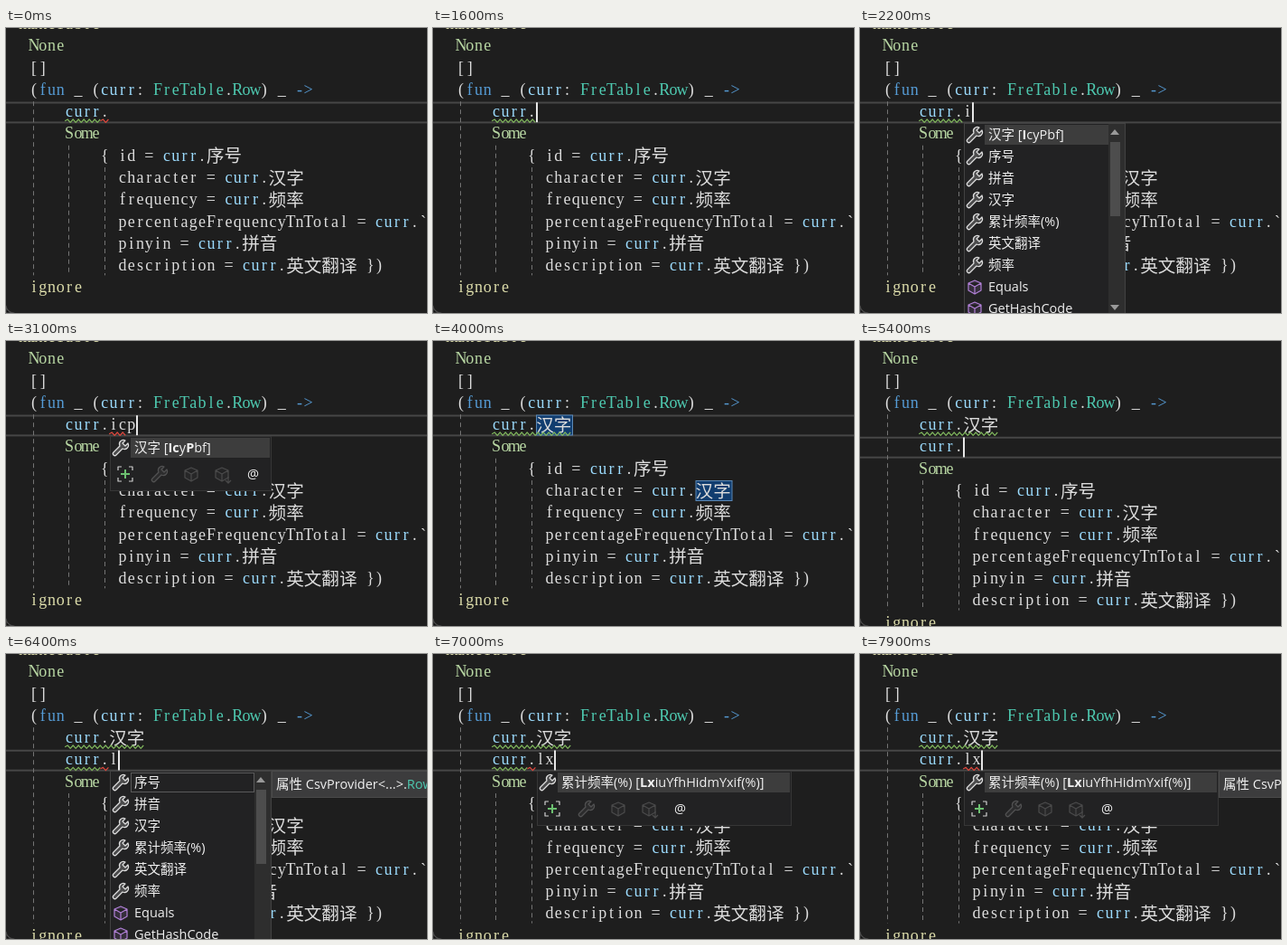
These frames come from a looping animation (466 by 315 pixels, 8 s). An HTML page:

```html
<!DOCTYPE html>
<html lang="zh">
<head>
<meta charset="utf-8">
<title>Pinyin completion</title>
<style>
  html, body { margin: 0; width: 100%; height: 100%; overflow: hidden; background: #1e1e1e; }
  svg { display: block; }
  text { white-space: pre; }
  .code { font: 18px "Liberation Serif", serif; text-anchor: middle; font-variant-ligatures: none; }
  .han { font: 300 19.6px "Noto Sans CJK SC", "Noto Sans CJK", sans-serif; }
  .ui { font: 14.5px "Open Sans", "Noto Sans CJK SC", "Noto Sans CJK", sans-serif; fill: #f0f0f0; }
</style>
</head>
<body>
<svg id="stage" width="466" height="315" viewBox="0 0 466 315"></svg>
<script>
const LOOP = 8000, CELL = 9.8, PITCH = 24.27;
const colX = c => 26 + c * CELL;
const rowY = r => 8.4 + r * PITCH;
const esc = s => s.replace(/&/g, '&amp;').replace(/</g, '&lt;');

const COLORS = { p: '#dcdcdc', f: '#dcdcaa', g: '#b8d7a3', k: '#569cd6', t: '#4ec9b0', v: '#9cdcfe' };

// Each line: column, then tokens "colour:text"
const HEAD = [
  [-1, 'f:makeTable'],
  [0, 'g:None'],
  [0, 'p:[]'],
  [0, 'p:(', 'k:fun', 'p: _ (', 'v:curr', 'p:: ', 't:FreTable', 'p:.', 't:Row', 'p:) _ ', 'k:->'],
];
const field = (name, value) => [10, 'p:' + name + ' = ', 'v:curr', 'p:.' + value];
const TAIL = [
  [4, 'g:Some'],
  [8, 'p:{ id = ', 'v:curr', 'p:.序号'],
  field('character', '汉字'),
  field('frequency', '频率'),
  field('percentageFrequencyTnTotal', '``'),
  field('pinyin', '拼音'),
  [...field('description', '英文翻译'), 'p: })'],
  [0, 'f:ignore'],
];

const MEMBERS = ['序号', '拼音', '汉字', '累计频率(%)', '英文翻译', '频率', 'Equals', 'GetHashCode'];
const bold = s => esc(s).replace(/\*(.+?)\*/g, '<tspan font-weight="700">$1</tspan>');

const rect = (x, y, w, h, fill, stroke = 'none') =>
  `<rect x="${x}" y="${y}" width="${w}" height="${h}" fill="${fill}" stroke="${stroke}"/>`;
const path = (d, stroke, fill = 'none', width = 1.2) =>
  `<path d="${d}" stroke="${stroke}" fill="${fill}" stroke-width="${width}" stroke-linejoin="round"/>`;
const at = (x, y, body, opacity = 1) => `<g transform="translate(${x} ${y})" opacity="${opacity}">${body}</g>`;
const label = (x, y, s) => `<text class="ui" x="${x}" y="${y}">${s}</text>`;

const WRENCH = path('M-8 5L-1 -2C-3 -6 1 -10 5 -8L2 -5L5 -2L8 -5C10 -1 6 3 2 1L-5 8A2 2 0 0 1 -8 5Z', '#dedede', '#ffffff30');
const cube = color => path('M0-7L7-4V4L0 8L-7 4V-4ZM-7-4L0 0L7-4M0 0V8', color, color + '22');

// Latin letters sit centred in their cells, Han characters take two cells
function codeLine(row, [col, ...tokens]) {
  let out = '';
  for (const token of tokens) {
    for (const run of token.slice(2).match(/[\u4e00-\u9fff]+|[^\u4e00-\u9fff]+/g) || []) {
      const han = run > '\u4e00';
      const xs = han ? colX(col) : [...run].map((_, i) => colX(col + i + .5).toFixed(1)).join(' ');
      out += `<text class="${han ? 'han' : 'code'}" x="${xs}" y="${rowY(row) + (han ? 18.6 : 17)}" fill="${COLORS[token[0]]}">${esc(run)}</text>`;
      col += run.length * (han ? 2 : 1);
    }
  }
  return out;
}

function guide(x, from, to) {
  return `<path d="M${x} ${from}V${to}" stroke="#747474" stroke-dasharray="5 4"/>`;
}

function squiggle(row, from, to, color) {
  const y = rowY(row) + 21.5;
  let d = `M${colX(from)} ${y}`;
  for (let x = colX(from) + 3, up = -1; x <= colX(to) + 1; x += 3, up = -up) d += `L${x} ${y + up * 1.7}`;
  return path(d, color);
}

function tooltip(x, y, body) {
  return rect(x + .5, y + .5, 480, 29, '#3c3c3d', '#4a4a4a') + label(x + 5, y + 20, body);
}

function iconBar(x, y) {
  return at(x + 17, y, path('M-4-8H-8V-4M4-8H8V-4M-4 8H-8V4M4 8H8V4', '#d0d0d0') + path('M-5 0H5M0-5V5', '#6cc070', 'none', 2)) +
    at(x + 55, y, WRENCH, .25) +
    at(x + 90, y, cube('#c0c0c0'), .25) +
    at(x + 124, y, cube('#c0c0c0') + path('M7 3V10M4 7L7 10L10 7', '#c0c0c0'), .25) +
    label(x + 152, y + 5, '@');
}

function menuItem(x, y, text) {
  const method = /^(Equals|GetHash|\*curr)/.test(text);
  return at(x + 12, y, method ? cube('#b180d7') : WRENCH) + label(x + 27, y + 5, bold(text));
}

function fullList(x, y, items, soft) {
  let out = rect(x + .5, y + .5, 178, 260, '#222223', '#424242') + rect(x + 160, y + 1, 18, 260, '#2e2e2e');
  out += soft ? rect(x + 23.5, y + 2.5, 136, 21, 'none', '#5a5a5a') : rect(x + 23, y + 2, 137, 22, '#3d3d3d');
  items.forEach((s, i) => out += menuItem(x, y + 13 + i * 24, s));
  return out + rect(x + 162, y + 21, 11, 82, '#4d4d4d') +
    path(`M${x + 162} ${y + 13}l5-6l5 6zM${x + 162} ${y + 201}l5 6l5-6z`, 'none', '#999');
}

function singleItem(x, y, width, text) {
  return rect(x + .5, y + .5, width - 1, 60, '#222223', '#363636') +
    rect(x + 23, y + 2, width - 25, 22, '#3d3d3d') + menuItem(x, y + 13, text) + iconBar(x, y + 42);
}

const typeName = s => `<tspan fill="${COLORS.t}">${s}</tspan>`;
const rowType = 'CsvProvider&lt;...>.' + typeName('Row');

const POPUPS = {
  icyAll: () => fullList(115, 105, ['汉字 [*I*cyPbf]', ...MEMBERS]),
  icy: () => singleItem(115, 105, 179, '汉字 [*Ic*yPbf]'),
  icp: () => singleItem(115, 105, 179, '汉字 [*Ic*y*P*bf]'),
  curr: () => singleItem(66, 129, 179, '*curr*'),
  all: () => fullList(115, 129, MEMBERS, true),
  lx: () => singleItem(115, 129, 282, '累计频率(%) [*Lx*iuYfhHidmYxif(%)]'),
};

// Each step overrides part of the state from its time on
const STEPS = [
  [0, { lines: ['curr.'], caret: 0, popup: '', tip: 0, marks: 0, wavy: [[0, 4, 8, 0], [0, 8, 9, 1]] }],
  [600, { caret: 1 }],
  [700, { wavy: [[0, 4, 9, 0]] }],
  [1100, { caret: 0 }],
  [1600, { caret: 1 }],
  [1800, { lines: ['curr.i'] }],
  [2200, { popup: 'icyAll' }],
  [2300, { lines: ['curr.ic'], popup: 'icy' }],
  [2400, { wavy: [[0, 9, 10, 1]] }],
  [2700, { tip: 294 }],
  [2900, { lines: ['curr.icp'], popup: 'icp' }],
  [3000, { tip: 0 }],
  [3100, { wavy: [[0, 9, 11, 1]] }],
  [3400, { lines: ['curr.汉字'], popup: '', wavy: [] }],
  [3800, { marks: 1 }],
  [3900, { caret: 0 }],
  [4000, { wavy: [[0, 4, 13, 0]] }],
  [4100, { lines: ['curr.汉字', ''], caret: 1, marks: 0 }],
  [4500, { lines: ['curr.汉字', 'c'] }],
  [4700, { lines: ['curr.汉字', 'cu'] }],
  [4800, { lines: ['curr.汉字', 'cur'] }],
  [4900, { lines: ['curr.汉字', 'curr'] }],
  [5200, { popup: 'curr', tip: 245 }],
  [5400, { lines: ['curr.汉字', 'curr.'], popup: '', tip: 0 }],
  [5800, { popup: 'all' }],
  [5900, { caret: 0 }],
  [6100, { tip: 294 }],
  [6300, { lines: ['curr.汉字', 'curr.l'], caret: 1 }],
  [6400, { wavy: [[0, 4, 13, 0], [1, 4, 8, 0], [1, 8, 9, 1]] }],
  [6900, { tip: 0, lines: ['curr.汉字', 'curr.lx'] }],
  [7000, { popup: 'lx' }],
  [7100, { wavy: [[0, 4, 13, 0], [1, 9, 10, 1]] }],
  [7400, { caret: 0, tip: 397 }],
  [7900, { caret: 1, wavy: [[0, 4, 13, 0], [1, 9, 11, 1]] }],
];

function draw(s) {
  const n = s.lines.length, active = 2 + n, y = rowY(active), end = rowY(active + 8) - 2;
  let out = rect(0, 0, 466, 315, '#1e1e1e');
  out += rect(0, y + .3, 466, 2, '#464646') + rect(0, y + 22.2, 466, 2, '#464646');
  out += guide(30.5, rowY(3), end) + guide(69.5, rowY(active + 2), end) + guide(109.5, rowY(active + 3), end);
  if (s.marks) {
    out += rect(114.5, 82, 40, 22, '#113d6f', '#5b88b5') + rect(291, 154.5, 40, 22, '#113d6f', '#5b88b5');
  }
  const typed = s.lines.map(line => [4, 'v:' + line.slice(0, 4), 'p:' + line.slice(4)]);
  [...HEAD, ...typed, ...TAIL].forEach((line, i) => out += codeLine(i - 1, line));
  for (const [i, from, to, bad] of s.wavy) out += squiggle(3 + i, from, to, bad ? '#e0483e' : '#7fb55c');
  if (s.caret) {
    const width = [...s.lines[n - 1]].reduce((w, c) => w + (c > '\u4e00' ? 2 : 1), 0);
    out += rect(Math.round(colX(4 + width)), y + 1, 2, 22, '#e6e6e6');
  }
  if (s.popup) out += POPUPS[s.popup]();
  if (s.tip) out += tooltip(s.tip, n > 1 ? 129 : 105, s.popup === 'curr' ? 'val curr: ' + rowType : '属性 ' + rowType + '.');
  return out + path('M0 307Q1 314 9 315H0Z', '#4a4a4a', '#111');
}

const stage = document.getElementById('stage');
let shown = -1;
function tick(now) {
  const t = now % LOOP;
  const past = STEPS.filter(([time]) => time <= t);
  if (past.length !== shown) {
    shown = past.length;
    stage.innerHTML = draw(Object.assign({}, ...past.map(([, change]) => change)));
  }
  requestAnimationFrame(tick);
}
tick(performance.now());
</script>
</body>
</html>
```
